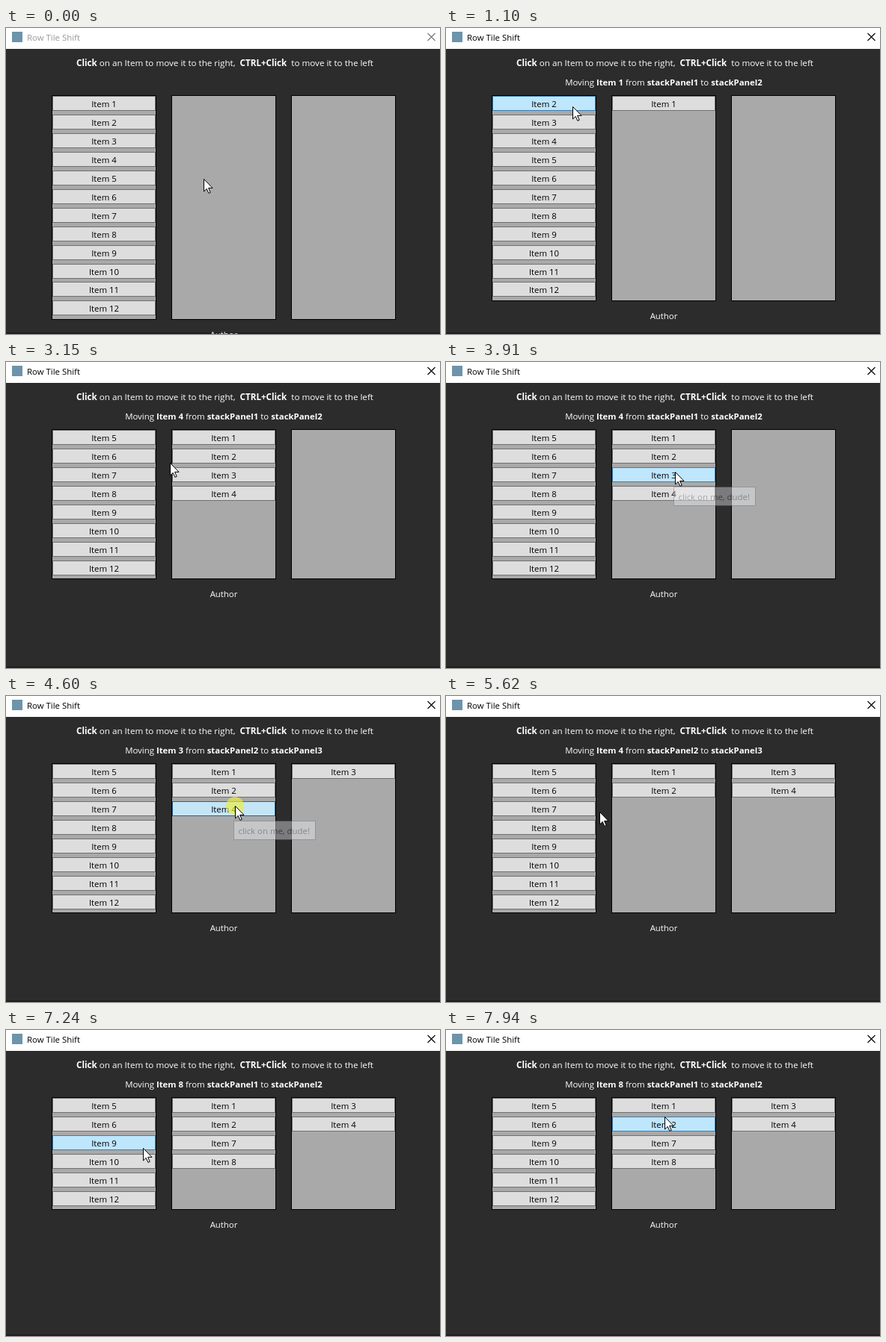
Write an HTML page that moves like this. It is 580 px wide and 410 px high and loops after 8 s.

```html
<!DOCTYPE html>
<html lang="en">
<head>
<meta charset="utf-8">
<title>Row Tile Shift</title>
<style>
  html, body { margin: 0; width: 100%; height: 100%; overflow: hidden; background: #2c2c2c; }
  svg { display: block; width: 580px; height: 410px; }
  text { font: 11.4px "Open Sans", "Noto Sans", sans-serif; white-space: pre; }
  .mid { text-anchor: middle; }
  .light { fill: #fff; }
  .bold { font-weight: 700; }
  #hint { font-size: 11.63px; }
</style>
</head>
<body>
<svg id="stage" viewBox="0 0 580 410">
  <rect width="580" height="410" fill="#2c2c2c"/>
  <rect y="408" width="580" height="2" fill="#241c20"/>
  <rect width="580" height="28" fill="#fff"/>
  <rect x="8" y="5" width="14" height="14" fill="#6d94ab"/>
  <text id="title" x="28" y="17">Row Tile Shift</text>
  <path id="close" d="M563.5 7 l10 10 m0 -10 l-10 10" stroke-width="1.1"/>
  <text class="mid light" id="hint" x="292.5" y="51"><tspan class="bold">Click</tspan> on an Item to move it to the right,  <tspan class="bold">CTRL+Click</tspan>  to move it to the left</text>
  <text class="mid light" id="message" x="291" y="77"></text>
  <g id="panels"></g>
  <g id="items"></g>
  <text class="mid light" id="author" x="291">Author</text>
  <g id="tip">
    <rect x=".5" y=".5" width="109" height="25" fill="#f1f2f7" stroke="#767676"/>
    <text x="6.5" y="17.5" fill="#575757">click on me, dude!</text>
  </g>
  <circle id="halo" r="12" fill="#eef03c" fill-opacity=".65"/>
  <path id="cursor" d="M.5 .5 V17 L4.2 13.4 L6.9 19.4 L9.2 18.4 L6.6 12.4 H12 Z" fill="#fff" stroke="#000"/>
</svg>
<script>
const LOOP = 8000, STEP = 70, HOLD = 140, TIP_DELAY = 400, SETTLE = 180;
const PITCH = 24.947, TOP = 91, COUNT = 12;
const $ = id => document.getElementById(id);
const panelX = p => 61 + 160 * p;
const rowY = i => TOP + Math.round(i * PITCH);

// release time of each click and the item under it
const clicks = [
  { at: 960, item: 1 }, { at: 1650, item: 2 }, { at: 1980, item: 3 }, { at: 2650, item: 4 },
  { at: 4190, item: 3 }, { at: 4660, item: 4 }, { at: 6170, item: 7 }, { at: 6970, item: 8 }
];

// the pointer glides to each point; sag bends the way downwards
const home = [264, 202];
const glides = [
  { start: 80, end: 620, to: [169, 105], sag: 0 },
  { start: 2720, end: 3150, to: [219, 135], sag: 0 },
  { start: 3220, end: 3630, to: [306, 147], sag: 20 },
  { start: 4860, end: 5620, to: [203, 155], sag: 0 },
  { start: 5690, end: 5830, to: [181, 156], sag: 0 },
  { start: 7190, end: 7940, to: [293, 114], sag: 32 }
];

function set(el, attrs) {
  for (const k in attrs) el.setAttribute(k, attrs[k]);
}
function make(tag, attrs, parent) {
  const el = document.createElementNS("http://www.w3.org/2000/svg", tag);
  set(el, attrs);
  return parent.appendChild(el);
}
const place = (el, x, y) => set(el, { transform: `translate(${x} ${y})` });
const show = (el, on) => set(el, { visibility: on ? "visible" : "hidden" });

const panels = [0, 1, 2].map(p => make("rect", {
  x: panelX(p) + .5, y: TOP - .5, width: 139, fill: "#a9a9a9", stroke: "#000"
}, $("panels")));

const items = Array.from({ length: COUNT }, (_, i) => {
  const g = make("g", {}, $("items"));
  const box = make("rect", { x: .5, y: .5, width: 137, height: 19 }, g);
  make("text", { class: "mid", x: 69, y: 15 }, g).textContent = "Item " + (i + 1);
  return { g, box };
});

function pointerAt(t) {
  let [x, y] = home, moving = false, rested = 0;
  for (const { start, end, to, sag } of glides) {
    if (t < start) break;
    const k = Math.min(1, (Math.floor((t - start) / STEP) + 1) * STEP / (end - start + STEP));
    const e = k * k * (3 - 2 * k);
    x += (to[0] - x) * e;
    y += (to[1] - y) * e + 4 * sag * e * (1 - e);
    moving = t < end;
    rested = end - SETTLE;
  }
  return { x: Math.round(x), y: Math.round(y), moving, rested };
}

const bold = s => `<tspan class="bold">${s}</tspan>`;

function replay(t) {
  const stacks = [items.map((_, i) => i + 1), [], []];
  let message = "", last = 0;
  for (const { at, item } of clicks) {
    if (t < at) break;
    const from = stacks.findIndex(s => s.includes(item));
    stacks[from].splice(stacks[from].indexOf(item), 1);
    stacks[from + 1].push(item);
    message = `Moving ${bold("Item " + item)} from ${bold("stackPanel" + (from + 1))} to ${bold("stackPanel" + (from + 2))}`;
    last = at;
  }
  return { stacks, message, last };
}

function drawItems(stacks, { x, y }, pressed) {
  let over = false;
  stacks.forEach((stack, p) => stack.forEach((n, i) => {
    const { g, box } = items[n - 1], left = panelX(p) + 1, top = rowY(i);
    const hover = x >= left && x < left + 138 && y >= top && y < top + 20;
    over = over || hover;
    place(g, left, top);
    set(box, {
      fill: !hover ? "#ddd" : pressed ? "#c4e5f6" : "#bee6fd",
      stroke: !hover ? "#707070" : pressed ? "#2c628b" : "#3c7fb1"
    });
  }));
  return over;
}

let shown = "";
function draw(t) {
  const pointer = pointerAt(t);
  const { stacks, message, last } = replay(t);
  const pressed = clicks.some(c => t >= c.at - HOLD && t < c.at);
  const active = t >= clicks[0].at - HOLD;
  const height = 25 * Math.max(...stacks.map(s => s.length));

  panels.forEach(p => set(p, { height }));
  set($("author"), { y: TOP + height + 24 });
  const over = drawItems(stacks, pointer, pressed);
  if (message !== shown) $("message").innerHTML = shown = message;
  set($("title"), { fill: active ? "#000" : "#999" });
  set($("close"), { stroke: active ? "#000" : "#777" });

  // the hint opens after the pointer has rested on the same item
  const wait = t - Math.max(last, pointer.rested) - TIP_DELAY;
  show($("tip"), over && !pointer.moving && wait >= 0);
  set($("tip"), { opacity: Math.min(1, .4 + Math.floor(Math.max(0, wait) / STEP) * .3) });
  place($("tip"), pointer.x - 2, pointer.y + 20);

  show($("halo"), pressed);
  place($("halo"), pointer.x, pointer.y);
  place($("cursor"), pointer.x, pointer.y);
}

const began = performance.now();
function tick() {
  draw((performance.now() - began) % LOOP);
  requestAnimationFrame(tick);
}
tick();
</script>
</body>
</html>
```
